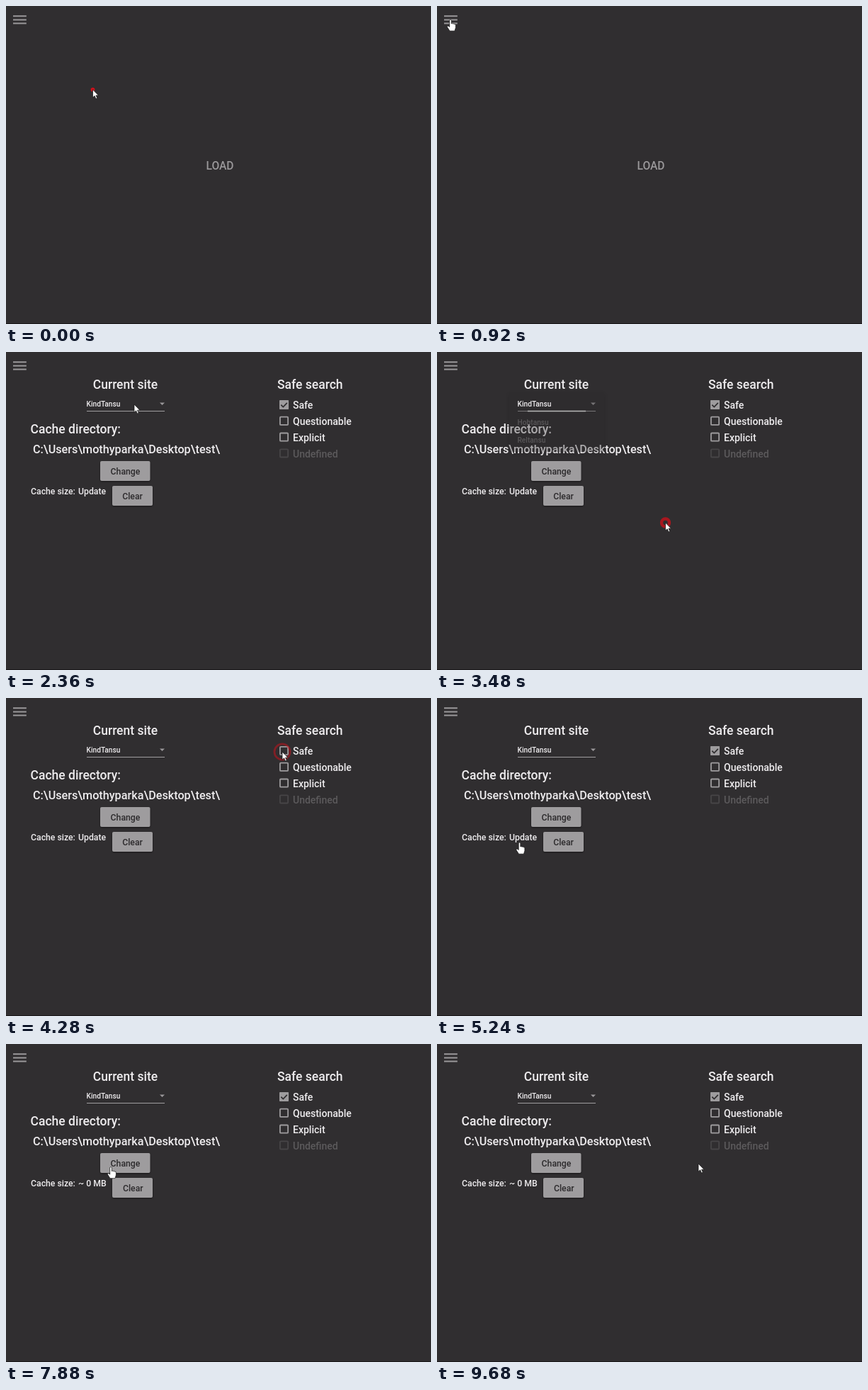
Write an HTML page that moves like this. It is 600 by 449 pixels and loops after 9920 ms.

```html
<!DOCTYPE html>
<html lang="en">
<head>
<meta charset="utf-8">
<title>Settings walkthrough</title>
<style>
  html, body { margin: 0; width: 100%; height: 100%; overflow: hidden; background: #302e30; }
  svg { display: block; width: 600px; height: 449px; }
  text { font-family: Roboto, Arial, sans-serif; font-weight: 500; fill: #eeecee; white-space: pre; }
  .mid { text-anchor: middle; }
  .title { font-size: 17.5px; }
  .label { font-size: 14px; }
  .small { font-size: 12.25px; }
  .option { font-size: 10.2px; }
  .nav { font-size: 11.3px; fill: #a8a6a8; }
  .button rect { fill: #9e9c9e; filter: drop-shadow(0 1px 1px rgba(0, 0, 0, .55)); }
  .button text { fill: #2c2a2c; }
  .panel rect { filter: drop-shadow(0 2px 3px rgba(0, 0, 0, .35)); }
  .dim { fill: #a8a6a8; }
</style>
</head>
<body>
<svg viewBox="0 0 600 449">
  <rect width="600" height="449" fill="#302e30"/>

  <g id="home">
    <text class="mid" x="302" y="231" style="font-size:15.6px;fill:#9b999b">LOAD</text>
  </g>

  <g id="settings">
    <text class="title mid" x="168.5" y="52">Current site</text>
    <text class="option" x="113.5" y="77">KindTansu</text>
    <path d="M217 71.5h7l-3.5 3.5z" fill="#9a989a"/>
    <path d="M114 83.5h110" stroke="#a09ea0"/>
    <path id="focus" d="M-55 0h110" stroke="#fff" stroke-width="1.3"/>

    <text class="title" x="34.5" y="115">Cache directory:</text>
    <text x="38" y="142.5" style="font-size:16.2px">C:\Users\mothyparka\Desktop\test\</text>
    <g class="button">
      <rect x="133" y="154" width="70.5" height="28" rx="2"/>
      <text class="small mid" x="168.5" y="172.5">Change</text>
    </g>
    <text class="small" x="35" y="201">Cache size:</text>
    <text class="small" id="size" x="102" y="201">Update</text>
    <g class="button">
      <rect x="150" y="189" width="57" height="28" rx="2"/>
      <text class="small mid" id="clear" x="178.5" y="207.5">Clear</text>
    </g>

    <text class="title" x="383" y="52">Safe search</text>
    <g id="checks"></g>

    <g id="panel" class="panel">
      <rect x="102" y="57" width="134" height="84" rx="2" fill="#2c2a2c"/>
      <text class="option" x="113.5" y="77">KindTansu</text>
      <text class="option dim" x="113.5" y="103">Hobtansu</text>
      <text class="option dim" x="113.5" y="128">Reltansu</text>
    </g>
  </g>

  <path d="M10 14.2h18.8M10 19.4h18.8M10 24.6h18.8" stroke="#9a989a" stroke-width="2"/>

  <rect id="shade" width="600" height="449" fill="#121012"/>
  <g id="drawer">
    <rect width="140" height="449" fill="#232124"/>
    <rect width="140" height="39" fill="#1f1d20"/>
    <rect id="row" y="39" width="140" height="34.5" fill="#2b292c"/>
    <path d="M130.3 19.5H112.5M119.3 12.8l-6.8 6.7 6.8 6.7" fill="none" stroke="#e8e6e8" stroke-width="2"/>
    <text class="nav mid" x="70" y="60.5">Settings</text>
    <text class="nav mid" x="70" y="95.5">Browse</text>
  </g>
  <rect y="448" width="600" height="1" fill="#1a181a"/>

  <circle id="ring" fill="none" stroke="#d2101a"/>
  <g id="cursor" fill="#fff" stroke="#111" stroke-width=".7" stroke-linejoin="round">
    <path id="arrow" d="M0 0V11.2L2.6 8.8 4.4 13 6.3 12.2 4.5 8.2H8z"/>
    <path id="hand" d="M-1.3 .8Q0-.8 1.3 .8V6Q2.5 5 3.6 6.2 4.8 5.4 5.8 6.8 7 6.2 7.4 7.8V11.5L6 16.2H-1L-4.6 10.6Q-4.6 8.6-2.8 9.3L-1.3 10.6z"/>
  </g>
</svg>
<script>
const LOOP = 9920;
const $ = id => document.getElementById(id);

// Pointer route: time, x, y
const route = [
  [0, 122.5, 118], [200, 122.5, 118], [880, 19, 19], [1080, 19, 19],
  [1460, 96.5, 51], [1720, 96.5, 51], [2280, 181, 74], [2760, 181, 74],
  [3360, 322.5, 241], [3640, 322.5, 241], [4080, 390, 76], [4680, 390, 76],
  [4800, 290, 46], [4940, 110, 80], [5060, 42, 165], [5220, 116.5, 204],
  [5880, 116.5, 204], [6340, 200, 207], [7240, 200, 207], [7760, 148, 173.5],
  [8520, 148, 173.5], [8800, 250, 62], [9080, 345, 120], [9320, 320, 220],
  [9500, 276, 245], [9680, 369, 169], [LOOP, 369, 169]
];
const clicks = [0, 960, 1640, 2480, 3400, 4120, 4520, 5600, 6640];
const RIPPLE = 320;

// Areas with a hand pointer on the settings page: x, y, width, height
const links = [[133, 154, 70, 28], [150, 189, 57, 28], [102, 190, 40, 16]];

const clamp = v => Math.max(0, Math.min(1, v));
const ramp = (t, from, length) => clamp((t - from) / length);
const easeOut = p => 1 - (1 - p) ** 3;
const show = (el, on) => el.setAttribute('visibility', on ? 'visible' : 'hidden');
const within = (x, y, [l, t, w, h]) => x >= l && x <= l + w && y >= t && y <= t + h;

function buildChecks() {
  const names = ['Safe', 'Questionable', 'Explicit', 'Undefined'];
  $('checks').innerHTML = names.map((name, i) => {
    const y = 74.5 + 22.8 * i;
    const off = i === 3;
    const tick = i ? '' : `<g id="tick"><rect x="386" y="68" width="13" height="13" rx="1" fill="#9e9c9e"/>
      <path d="M388.3 74.6l3 3 5.5-5.8" fill="none" stroke="#302e30" stroke-width="1.7"/></g>`;
    return `<rect x="386.9" y="${y - 5.6}" width="11.2" height="11.2" rx="1" fill="none"
        stroke="${off ? '#474547' : '#9e9c9e'}" stroke-width="1.8"/>${tick}
      <text class="label" x="405" y="${y + 5.7}"${off ? ' style="fill:#5c5a5c"' : ''}>${name}</text>`;
  }).join('');
}

// Curved between moving points, at rest between equal ones
function pointer(t) {
  let i = 0;
  while (i < route.length - 2 && t >= route[i + 1][0]) i++;
  const a = route[i], b = route[i + 1];
  const p = ramp(t, a[0], b[0] - a[0]);
  const still = (m, n) => !m || !n || (m[1] === n[1] && m[2] === n[2]);
  const slope = (k, axis) => {
    const m = route[k - 1], c = route[k], n = route[k + 1];
    if (still(m, c) || still(c, n)) return 0;
    return (n[axis] - m[axis]) / (n[0] - m[0]) * (b[0] - a[0]);
  };
  const q = p * p * (3 - 2 * p);
  return [1, 2].map(axis => a[axis] + (b[axis] - a[axis]) * q
    + slope(i, axis) * p * (1 - p) ** 2 - slope(i + 1, axis) * p * p * (1 - p));
}

function drawRipple(t) {
  const start = clicks.filter(c => c <= t).pop();
  const age = t - start;
  show($('ring'), age < RIPPLE);
  if (age >= RIPPLE) return;
  const [x, y] = pointer(start);
  const outer = 2.8 + age * .06;
  const inner = Math.max(0, (age - 40) * .08);
  const ring = $('ring');
  ring.setAttribute('cx', x);
  ring.setAttribute('cy', y);
  ring.setAttribute('r', (outer + inner) / 2);
  ring.setAttribute('stroke-width', Math.max(.5, outer - inner));
  ring.setAttribute('opacity', 1 - age / RIPPLE);
}

function draw(t) {
  const onSettings = t >= 1720;
  show($('home'), !onSettings);
  show($('settings'), onSettings);

  const open = easeOut(ramp(t, 980, 400)) * (1 - easeOut(ramp(t, 1720, 400)));
  $('shade').setAttribute('opacity', .88 * open);
  $('drawer').setAttribute('transform', `translate(${140 * (open - 1)})`);

  const [x, y] = pointer(t);
  show($('row'), open > 0 && within(x, y, [0, 39, 140, 34.5]));

  const panel = ramp(t, 2520, 120) * (1 - ramp(t, 3400, 120));
  const grow = t < 3400 ? .8 + .2 * easeOut(ramp(t, 2520, 120)) : 1;
  $('panel').setAttribute('opacity', panel);
  $('panel').setAttribute('transform', `translate(0 ${73 * (1 - grow)}) scale(1 ${grow})`);
  const focus = easeOut(ramp(t, 2480, 300)) * (1 - ramp(t, 3400, 320));
  $('focus').setAttribute('transform', `translate(169 83.5) scale(${focus} 1)`);
  $('focus').setAttribute('opacity', focus > 0 ? 1 : 0);

  $('tick').setAttribute('opacity', 1 - ramp(t, 4160, 80) + ramp(t, 4560, 80));
  const counted = t >= 5680;
  $('size').textContent = counted ? '~ 0 MB' : 'Update';
  $('clear').setAttribute('x', counted ? 179.3 : 178.5);

  const hand = onSettings ? links.some(area => within(x, y, area))
    : open < .2 && within(x, y, [8, 10, 22, 20]);
  $('cursor').setAttribute('transform', `translate(${x} ${y})`);
  $('arrow').style.display = hand ? 'none' : '';
  $('hand').style.display = hand ? '' : 'none';
  drawRipple(t);
}

buildChecks();
const begin = performance.now();
function tick() {
  draw((performance.now() - begin) % LOOP);
  requestAnimationFrame(tick);
}
tick();
</script>
</body>
</html>
```
